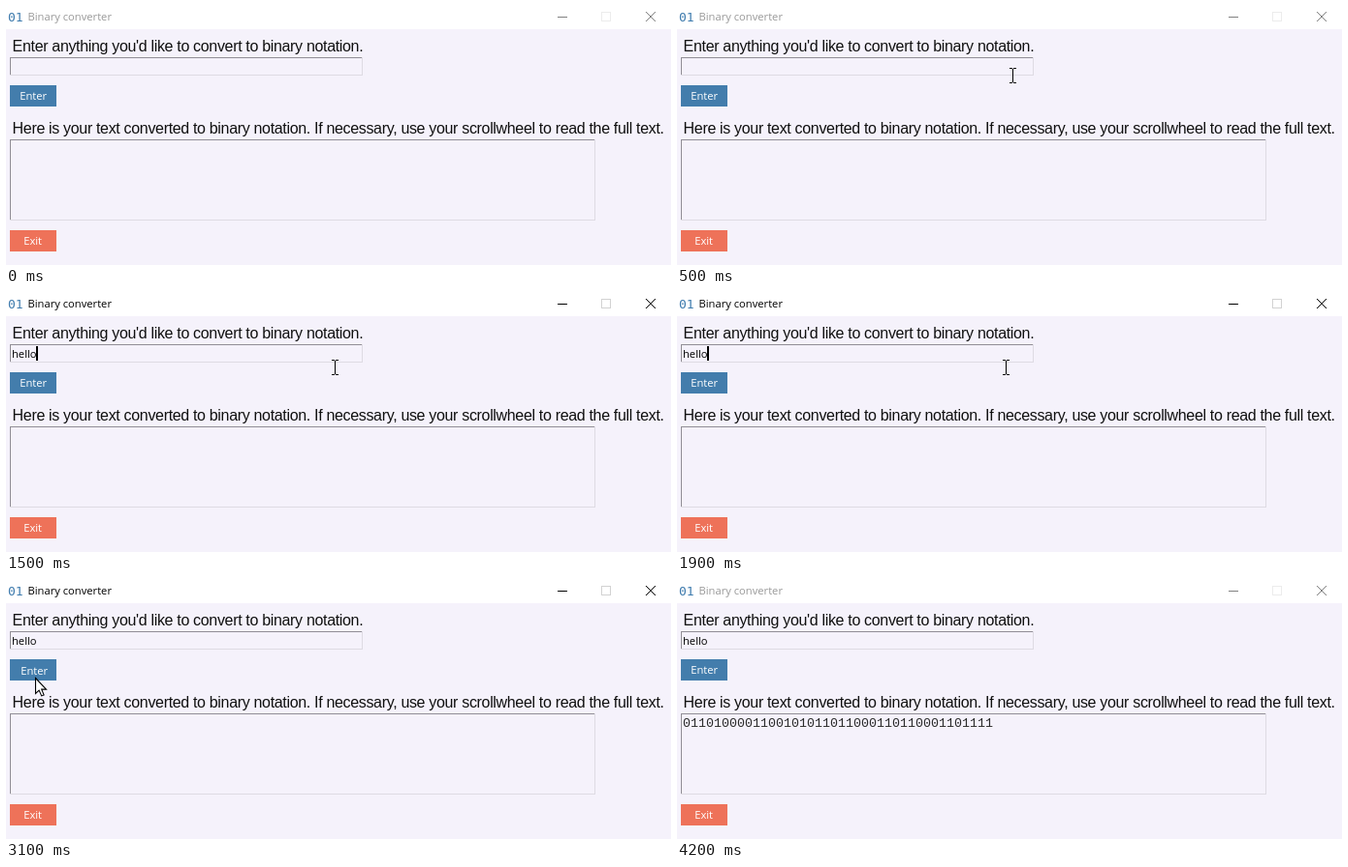
Recreate the animation shown at these times as an HTML page with a canvas. Size 686x268 px, loop 4300 ms.

```html
<!DOCTYPE html>
<html lang="en">
<head>
<meta charset="utf-8">
<title>Binary converter</title>
<style>
  html, body { margin: 0; width: 100%; height: 100%; overflow: hidden; background: #f5f2fb; }
  canvas { display: block; }
</style>
</head>
<body>
<canvas id="stage" width="686" height="268"></canvas>
<script>
const ctx = document.getElementById('stage').getContext('2d');

const LOOP = 4300, STEP = 100;
const BACK = '#f5f2fb';
const UI = '11.2px "Open Sans", sans-serif';
const LABEL = '16px "Liberation Sans", Arial, sans-serif';
const MONO = '13.33px "Liberation Mono", monospace';
const ICON = '13px "DejaVu Sans Mono", monospace';

const WORD = 'hello';
const BINARY = [...WORD].map(c => c.charCodeAt(0).toString(2).padStart(8, '0')).join('');

// Pointer positions: time, x, y
const PATH = [
  [300, 560, 140], [400, 420, 92], [500, 346, 72], [600, 341, 66], [800, 339, 66],
  [900, 339, 77], [2300, 339, 77], [2400, 318, 78], [2700, 124, 90], [2800, 74, 96],
  [2900, 40, 100], [3000, 30, 101], [3200, 30, 101], [3300, 44, 185]
];
// Typing: time, letters shown
const KEYS = [[1200, 1], [1300, 2], [1400, 4], [1500, 5]];

function rect(x, y, w, h, color) {
  ctx.fillStyle = color;
  ctx.fillRect(x, y, w, h);
}

function text(str, x, y, font, color) {
  ctx.font = font;
  ctx.fillStyle = color;
  ctx.fillText(str, x, y);
}

function label(str, y) {
  ctx.letterSpacing = '-0.33px';
  text(str, 6.6, y, LABEL, '#101010');
  ctx.letterSpacing = '0px';
}

function sunken(x, y, w, h) {
  rect(x, y, w, h, '#dedbe3');
  rect(x, y, w - 1, h - 1, '#918e96');
  rect(x + 1, y + 1, w - 2, h - 2, BACK);
}

function button(str, x, y, color, pad, pressed) {
  rect(x, y, 48, 22, color);
  const d = pressed ? 1 : 0;
  text(str, x + pad + d, y + 15 + d, UI, '#fff');
}

function line(color, ...pts) {
  ctx.strokeStyle = color;
  ctx.lineWidth = 1;
  ctx.beginPath();
  pts.forEach(([x, y], i) => i ? ctx.lineTo(x, y) : ctx.moveTo(x, y));
  ctx.stroke();
}

function titleBar(active) {
  const ink = active ? '#000' : '#808080';
  rect(0, 0, 686, 24, '#fff');
  text('01', 2, 16, ICON, '#3f7cae');
  text('Binary converter', 22.5, 15, UI, active ? '#000' : '#999');
  rect(569, 11, 10, 1, ink);
  ctx.strokeStyle = active ? '#d2d2d2' : '#ececec';
  ctx.lineWidth = 1;
  ctx.strokeRect(614.5, 6.5, 9, 9);
  line(ink, [660, 6], [670, 16]);
  line(ink, [670, 6], [660, 16]);
}

function beam(x, y) {
  rect(x, y - 7, 1, 14, '#000');
  for (const dy of [-8, 7]) {
    rect(x - 3, y + dy, 3, 1, '#000');
    rect(x + 1, y + dy, 3, 1, '#000');
  }
}

function arrow(x, y) {
  const shape = [[0, 0], [0, 16], [3.6, 12.6], [6.2, 18.4], [8.6, 17.4], [6.2, 11.6], [11, 11.6]];
  ctx.beginPath();
  for (const [dx, dy] of shape) ctx.lineTo(x + 0.5 + dx, y + 0.5 + dy);
  ctx.closePath();
  ctx.fillStyle = '#fff';
  ctx.fill();
  ctx.strokeStyle = '#000';
  ctx.lineWidth = 1.1;
  ctx.stroke();
}

function pointer(t) {
  const last = PATH[PATH.length - 1];
  if (t < PATH[0][0] || t > last[0]) return;
  const i = Math.max(1, PATH.findIndex(p => p[0] >= t));
  const [t0, x0, y0] = PATH[i - 1], [t1, x1, y1] = PATH[i];
  const k = (t - t0) / (t1 - t0);
  const x = Math.round(x0 + (x1 - x0) * k), y = Math.round(y0 + (y1 - y0) * k);
  (t >= 500 && t < 2400 ? beam : arrow)(x, y);
}

// The caret blinks 600 ms on, 300 ms off, counted from the last key
function caretOn(t, active) {
  if (!active) return false;
  return t < 1500 || (t - 1500) % 900 < 600;
}

function draw(t) {
  const active = t >= 600 && t < 4100;
  const typed = KEYS.reduce((n, [at, count]) => t >= at ? count : n, 0);
  const entry = WORD.slice(0, typed);

  rect(0, 0, 686, 268, BACK);
  titleBar(active);

  label("Enter anything you'd like to convert to binary notation.", 47);
  sunken(4, 53, 364, 19);
  text(entry, 6, 67, UI, '#000');
  if (caretOn(t, active)) {
    rect(Math.round(6 + ctx.measureText(entry).width) - 1, 55, 2, 15, '#000');
  }
  button('Enter', 4, 82, '#437dac', 10.2, t >= 3000 && t < 3200);

  label('Here is your text converted to binary notation. If necessary, ' +
    'use your scrollwheel to read the full text.', 132);
  sunken(4, 138, 604, 84);
  if (t >= 3200) text(BINARY, 6, 152, MONO, '#2c2c2c');
  button('Exit', 4, 232, '#ee7259', 14.2, false);

  pointer(t);
}

function tick(now) {
  draw(Math.floor((now % LOOP) / STEP) * STEP);
  requestAnimationFrame(tick);
}
requestAnimationFrame(tick);
</script>
</body>
</html>
```
